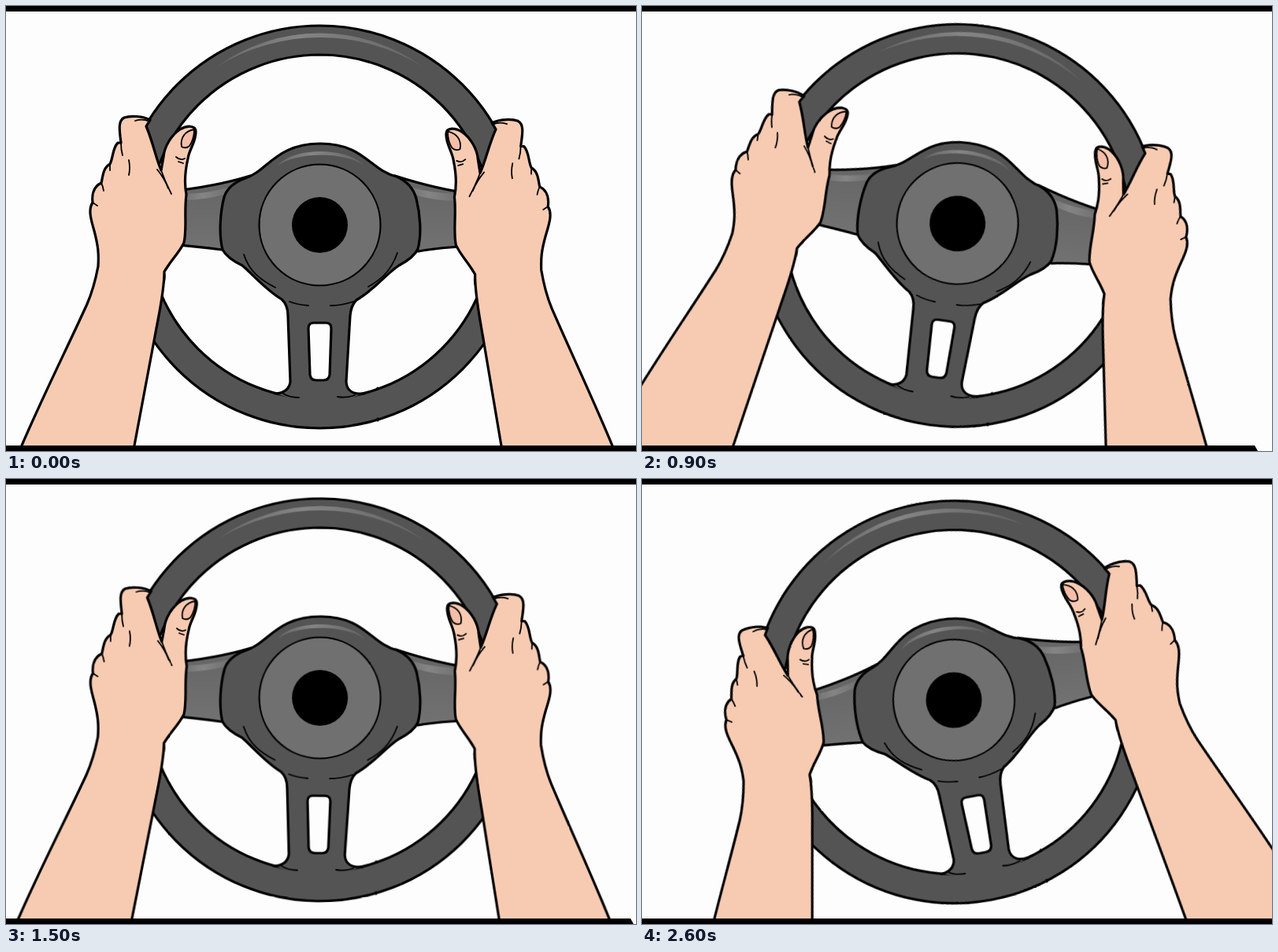
These frames come from a looping animation (800x566 px, 2.7 s). An HTML page without scripts:

```html
<!DOCTYPE html>
<html lang="en">
<head>
<meta charset="utf-8">
<title>Steering wheel</title>
<style>
  html, body { margin: 0; width: 100%; height: 100%; overflow: hidden; background: #fdfdfd; }
  svg { display: block; width: 100%; height: 100%; }

  .steer, .corner { animation: steer 2.7s -8ms infinite; }
  .steer { transform-origin: 412px 293px; }
  .corner { animation-name: corner; }

  /* One pose every 100 ms */
  @keyframes steer {
    0%      { transform: rotate(0deg);     animation-timing-function: steps(7); }
    25.926% { transform: rotate(7deg);     animation-timing-function: steps(2); }
    33.333% { transform: rotate(8deg);     animation-timing-function: steps(2); }
    40.741% { transform: rotate(6.7deg);   animation-timing-function: steps(4); }
    55.556% { transform: rotate(.55deg);   animation-timing-function: steps(4); }
    70.37%  { transform: rotate(-3.8deg);  animation-timing-function: steps(7); }
    96.296%, 100% { transform: rotate(-10.6deg); }
  }
  @keyframes corner {
    0%, 18.519% { transform: translateX(800px); animation-timing-function: step-end; }
    22.222% { transform: translateX(782px); animation-timing-function: steps(3); }
    33.333% { transform: translateX(778px); animation-timing-function: steps(2); }
    40.741% { transform: translateX(780px); animation-timing-function: steps(4); }
    55.556% { transform: translateX(793px); animation-timing-function: steps(2); }
    62.963%, 100% { transform: translateX(800px); }
  }

  .line { stroke: #000; stroke-width: 3.2; stroke-linejoin: round; stroke-linecap: round; }
  .thin { stroke: #000; stroke-width: 1.8; stroke-linecap: round; fill: none; }
  .dark { fill: #545454; }
  .skin { fill: #f7cbb2; }
  .nail { fill: #f5bea8; stroke: #000; stroke-width: 1.8; stroke-linejoin: round; }
  .paper { fill: #fdfdfd; }
</style>
</head>
<body>
<svg viewBox="0 0 800 566">
  <defs>
    <linearGradient id="shine">
      <stop offset="0" stop-color="#858585" stop-opacity=".4"/>
      <stop offset=".4" stop-color="#858585"/>
      <stop offset="1" stop-color="#858585" stop-opacity=".3"/>
    </linearGradient>
    <linearGradient id="spoke" x2="0" y2="1">
      <stop offset="0" stop-color="#646464"/>
      <stop offset="1" stop-color="#727272"/>
    </linearGradient>

    <g id="hand">
      <path class="skin line" d="M178 153 L183 145 C174 140 158 139 150 142 C142 146 144 158 146 174
        L142 174 C135 181 136 194 132 201 C123 206 123 217 121 225 C110 230 109 242 110 250
        C104 259 108 272 112 286 C117 305 118 315 117 331 C114 347 109 365 103 379
        C80 430 46 498 20 559 L-45 700 L137 700 L163 559 L190 415 C195 388 201 362 201 338
        C208 325 220 314 226 301 C230 282 226 262 229 240 C226 224 228 207 231 194
        C233 181 241 174 241 160 C241 151 229 152 221 157 C210 164 201 179 200 192
        L197 209 C190 193 187 174 178 153 Z"/>
      <path class="nail" d="M223 179 C221 168 227 159 239 157 C239 165 237 172 233 178 Q228 182 223 179 Z"/>
      <path class="thin" d="M197 209 Q202 223 210 239 M156 196 Q158 206 156 215 M146 174 Q146 183 148 190
        M132 201 V209 M121 225 Q123 229 124 235 M110 250 L116 254
        M182 147 Q174 143 164 146 M216 192 Q221 197 227 194 M219 198 L225 200
        M192 208 Q201 219 206 232 M201 338 Q205 333 208 328 M201 338 Q203 346 200 354"/>
    </g>
  </defs>

  <rect class="paper" width="800" height="566"/>

  <g class="steer">
    <g class="rim">
      <path class="dark line" fill-rule="evenodd" d="M398.5 25 a256 256 0 0 1 0 512 a256 256 0 0 1 0 -512 Z
        M398.5 62 a219 219 0 0 0 0 438 a219 219 0 0 0 0 -438 Z"/>
      <path fill="url(#shine)" d="M268 77 A222 222 0 0 1 529 77 A249 249 0 0 0 268 77 Z"/>
      <path class="line" d="M472 525 v2 M472 486 v1"/>
    </g>

    <g class="spokes">
      <path class="line" fill="url(#spoke)" d="M205 236 Q265 230 310 216 V310 H274 Q245 306 205 303 Z"/>
      <path class="line" fill="url(#spoke)" d="M595 239 Q550 234 494 216 V312 H524 Q550 307 595 305 Z"/>
      <path fill="url(#shine)" d="M228 239 Q258 238 282 231 L276 240 Q255 246 228 247 Z"/>
      <path fill="url(#shine)" d="M512 230 Q540 238 572 239 V248 Q540 247 519 240 Z"/>
    </g>

    <g class="hub">
      <path class="dark" d="M343 493 Q398.5 515 454 493 Z"/>
      <path class="dark line" d="M342 493 Q359 492 361 478 L358 394 Q358 380 350 373
        C330 361 314 342 300 330 Q281 321 275 310 C270 290 272 262 277 243 Q282 227 304 219
        C332 210 343 175 399 175 C455 175 462 209 496 217 Q516 226 521 245
        C526 265 528 290 523 309 Q518 320 499 330 C481 342 468 361 445 374
        Q438 381 437 394 L432 478 Q433 495 455 493"/>
      <path fill="url(#shine)" d="M345 203 C365 179 433 179 455 203 C430 185 370 185 345 203 Z"/>
      <path class="thin" d="M302 316 C309 338 324 349 342 358 M497 314 C489 337 476 348 460 357
        M360 376 Q370 380 384 381 M412 381 Q426 381 441 376
        M352 493 Q360 498 372 498 M421 497 Q432 499 443 495"/>
      <path class="paper line" d="M391 403 h15 q7 0 7 7 l-2 59 q-1 7 -8 7 h-9 q-7 0 -8 -7 l-2 -59 q0 -7 7 -7 Z"/>
      <circle cx="398.5" cy="278.5" r="77" fill="#707070" stroke="#000" stroke-width="2.2"/>
      <circle cx="398.5" cy="278.5" r="35.5"/>
    </g>

    <use href="#hand"/>
    <use href="#hand" transform="rotate(1.05 412 293) translate(797.5 0) scale(-1 1)"/>
  </g>

  <path d="M0 0 h800 v7 h-800 Z M0 559 h800 v7 h-800 Z"/>
  <path class="corner paper" d="M0 559 h40 v7 h-36 Z"/>
</svg>
</body>
</html>
```
